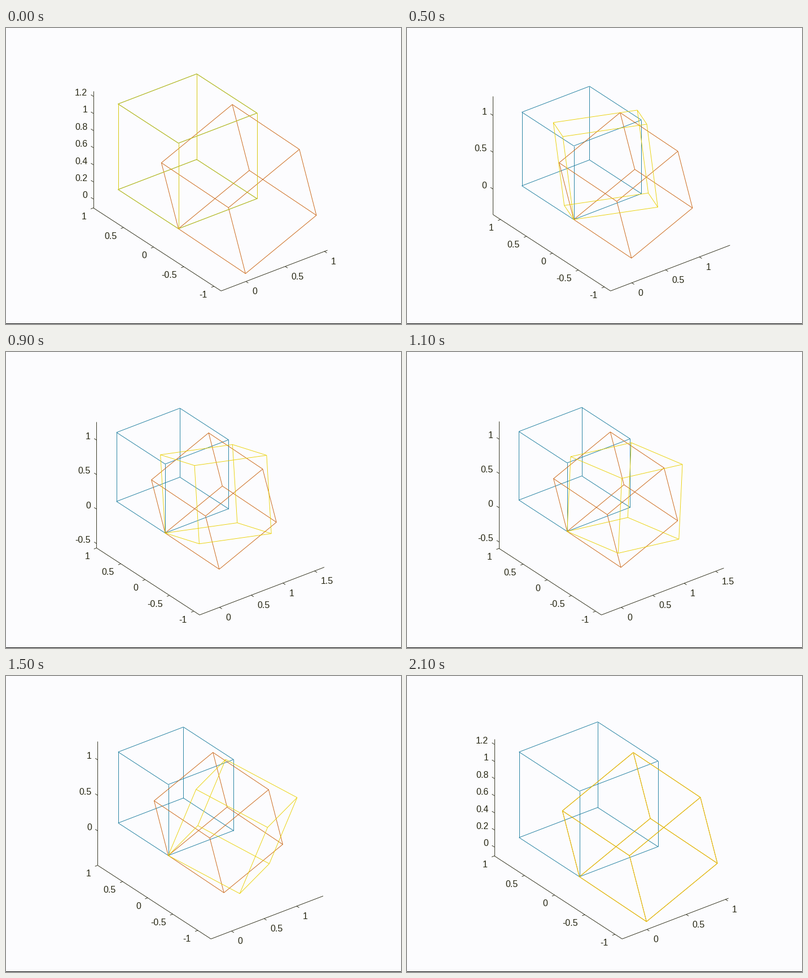
A matplotlib script that plays this animation: 700 by 526 pixels, repeating every 2.2 s.

```python
from itertools import product

import matplotlib.pyplot as plt
import numpy as np
from matplotlib.animation import FuncAnimation
from matplotlib.collections import LineCollection

W, H, DPI = 700, 526, 100
FRAMES, INTERVAL = 22, 100
PX = 72 / DPI
BLUE, ORANGE, YELLOW = "#187a9c", "#c8600c", "#ead000"
INK, PAPER = "#262612", "#fcfcfe"

# Orthographic view: azimuth -37.5, elevation 30 degrees
AZ, EL = np.radians([-37.5, 30])
RIGHT = np.array([np.cos(AZ), np.sin(AZ), 0])
UP = np.array([-np.sin(AZ) * np.sin(EL), np.cos(AZ) * np.sin(EL), np.cos(EL)])
CENTER = np.array([362.25, 253.3])
BOX_HEIGHT = 427.9

CUBE = np.array(list(product((0, 1), repeat=3)), float)
EDGES = [(i, i | b) for i in range(8) for b in (1, 2, 4) if not i & b]

# Final attitude as a quaternion (w, x, y, z)
ATTITUDE = np.array([0.0685, -0.581, 0.015, -0.8105])
ATTITUDE /= np.linalg.norm(ATTITUDE)
ANGLE = 2 * np.arccos(ATTITUDE[0])
AXIS = ATTITUDE[1:] / np.linalg.norm(ATTITUDE[1:])


def turned(t):
    """Cube corners after the fraction t of the rotation."""
    x, y, z = AXIS
    k = np.array([[0, -z, y], [z, 0, -x], [-y, x, 0]])
    a = ANGLE * t
    rot = np.eye(3) + np.sin(a) * k + (1 - np.cos(a)) * k @ k
    return CUBE @ rot.T


GOAL = turned(1)

fig = plt.figure(figsize=(W / DPI, H / DPI), dpi=DPI, facecolor=PAPER)
ax = fig.add_axes([0, 0, 1, 1])
ax.set(xlim=(0, W), ylim=(H, 0))
ax.axis("off")
ax.axhspan(H - 1, H, color="black", lw=0)

drawn = []


def add_lines(segments, color, z):
    lines = LineCollection(segments, colors=color, linewidths=0.9 * PX, zorder=z)
    drawn.append(ax.add_collection(lines, autolim=False))


def add_label(value, pos, ha):
    drawn.append(ax.text(pos[0], pos[1] + 5.5, f"{value:g}",
                         ha=ha, va="baseline", color=INK,
                         family="Liberation Sans", fontsize=16 * PX))


def ticks(lo, hi, step):
    n = np.arange(np.ceil(lo / step - 1e-6), np.floor(hi / step + 1e-6) + 1)
    return np.round(n * step, 3) + 0.0


def update(k):
    while drawn:
        drawn.pop().remove()

    # The turn rests for one step at each end
    moving = turned(np.clip((k - 1) / (FRAMES - 3), 0, 1))
    points = np.vstack([CUBE, GOAL, moving])
    lo, hi = points.min(0), points.max(0)
    scale = BOX_HEIGHT / (UP @ (hi - lo))
    mid = (lo + hi) / 2

    def project(p):
        d = np.asarray(p) - mid
        return CENTER + scale * np.stack([d @ RIGHT, -(d @ UP)], axis=-1)

    for z, (corners, color) in enumerate(
            [(CUBE, BLUE), (GOAL, ORANGE), (moving, YELLOW)], 2):
        flat = project(corners)
        add_lines([flat[list(e)] for e in EDGES], color, z)

    front, left = lo, np.array([lo[0], hi[1], lo[2]])
    far = np.array([hi[0], lo[1], lo[2]])
    top = np.array([lo[0], hi[1], hi[2]])
    frame = [project([top, left]), project([left, front]), project([front, far])]

    # Per axis: base corner, tick direction, label offset, alignment, step
    x_dir = np.array([RIGHT[0], -UP[0]])
    y_dir = np.array([RIGHT[1], -UP[1]])
    z_step = 0.2 if hi[2] - lo[2] < 1.4 else 0.5
    rules = [(front, -y_dir, (11, 17.5), "left", 0.5),
             (front, -x_dir, (-12, 14.5), "right", 0.5),
             (left, y_dir, (-10.5, -7), "right", z_step)]
    for i, (base, way, offset, ha, step) in enumerate(rules):
        way = 5 * way / np.hypot(*way)
        for v in ticks(lo[i], hi[i], step):
            p = base.copy()
            p[i] = v
            at = project(p)
            frame.append(np.array([at, at + way]))
            add_label(v, at + offset, ha)
    add_lines(frame, INK, 1)
    return drawn


anim = FuncAnimation(fig, update, frames=FRAMES, interval=INTERVAL,
                     init_func=lambda: update(0), repeat=True, repeat_delay=0,
                     blit=False)
plt.show()
```
